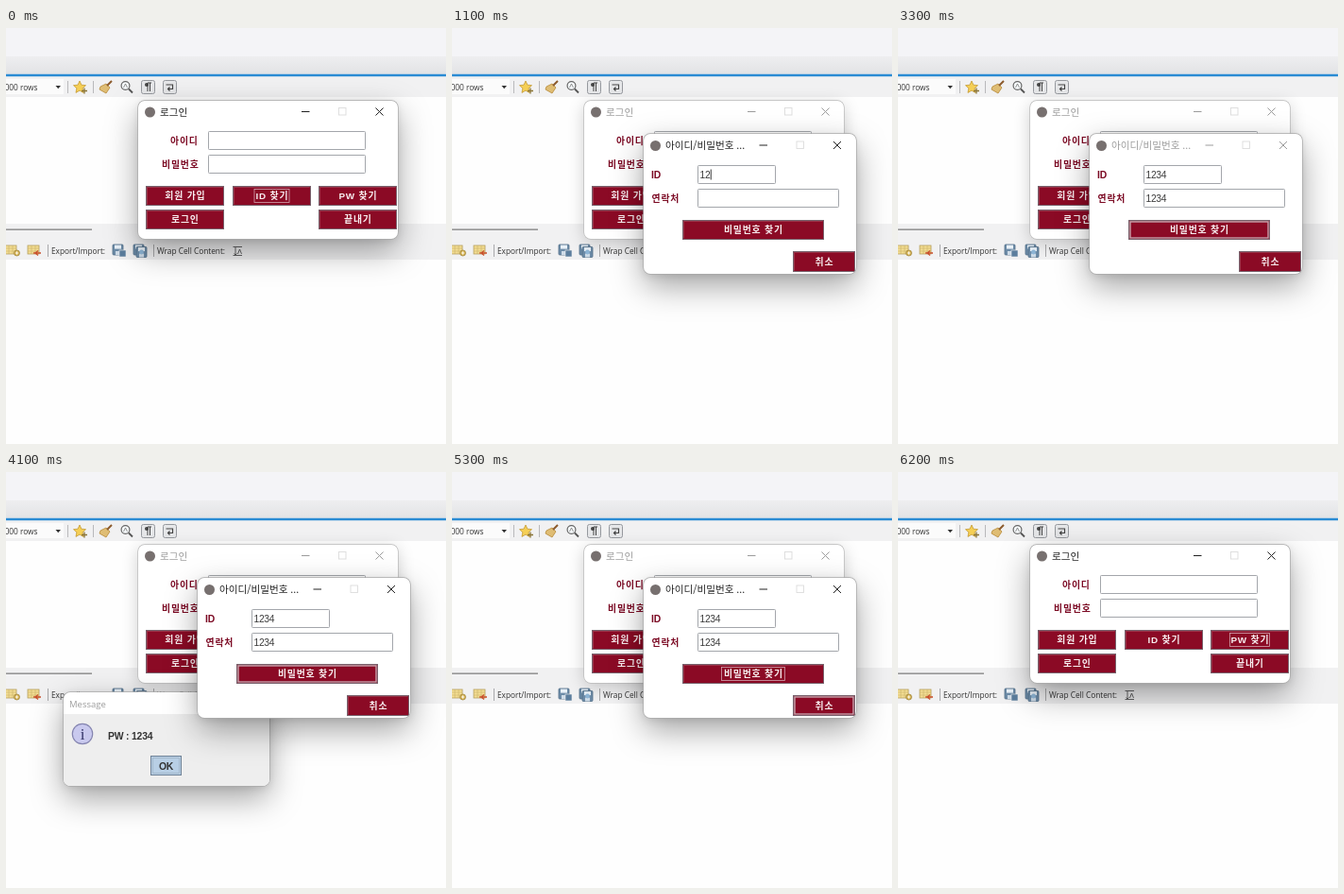
Animation, 466 px wide and 440 px high, one loop 6300 ms. Source, as an HTML page:

```html
<!DOCTYPE html>
<html lang="ko">
<head>
<meta charset="utf-8">
<title>Password lookup</title>
<style>
html, body { margin: 0; width: 100%; height: 100%; overflow: hidden; background: #fefefe; }
#stage { position: relative; width: 466px; height: 440px; overflow: hidden; }
svg { display: block; }
.win { position: absolute; overflow: hidden; border-radius: 7px; background: #fff;
  box-shadow: 0 0 0 .7px #bbb, 0 4px 18px rgba(0,0,0,.2); }
.win.lifted { box-shadow: 0 0 0 .7px #aaa, 0 13px 34px rgba(0,0,0,.36), 0 2px 8px rgba(0,0,0,.1); }
.bar { color: #9c9c9c; }
.active .bar { color: #222; }
text { white-space: pre; }
.ui { font-family: "Open Sans", "Noto Sans", sans-serif; font-size: 8.3px; fill: #333; }
.title { font-family: "Noto Sans CJK KR", "Noto Sans CJK", sans-serif; font-size: 10.6px; fill: currentColor; }
.bold { font: bold 9.9px "Liberation Sans", "Noto Sans CJK KR", "Noto Sans CJK", sans-serif; letter-spacing: .8px; }
.label { fill: #7c0a24; }
.latin { font-size: 10.4px; letter-spacing: -.2px; }
.num { font: 10.3px "Liberation Sans", sans-serif; letter-spacing: -.35px; fill: #3c3c3c; }
</style>
</head>
<body>
<div id="stage"></div>
<script>
const stage = document.getElementById('stage');
const LOOP = 6300, STEP = 100;

const rect = (x, y, w, h, fill, more = '') =>
  `<rect x="${x}" y="${y}" width="${w}" height="${h}" fill="${fill}" ${more}/>`;
const path = (d, stroke, width = 1, fill = 'none') =>
  `<path d="${d}" stroke="${stroke}" stroke-width="${width}" fill="${fill}"/>`;
const text = (x, y, str, cls, more = '') => `<text x="${x}" y="${y}" class="${cls}" ${more}>${str}</text>`;
const dot = (x, y, r, fill, more = '') => `<circle cx="${x}" cy="${y}" r="${r}" fill="${fill}" ${more}/>`;
const outline = color => `stroke="${color}"`;

function button(id, x, y, w, h, label, textW) {
  const cx = x + w / 2, cy = y + h / 2;
  return rect(x + .5, y + .5, w - 1, h - 1, '#8b0a25', outline('#77606b'))
    + path(`M${x + 1.5} ${y + h - 1.5}V${y + 1.5}H${x + w - 1.5}`, '#a14558', .7)
    + rect(x + 2, y + 2, w - 4, h - 4, 'none', `stroke="#c6abb2" stroke-width="1.3" id="${id}Press"`)
    + rect(cx - textW / 2 - 1.5, cy - 7, textW + 3, 14, 'none', `stroke="#d3a2ad" stroke-width=".8" id="${id}Focus"`)
    + text(cx + .4, cy + 3.7, label, 'bold', 'fill="#f8eef0" text-anchor="middle"');
}

const field = (x, y, w, id = '') =>
  rect(x + .5, y + .5, w - 1, 19, '#fff', outline('#a3a6ab') + ' rx=".8"')
  + (id ? text(x + 2.5, y + 14, '', 'num', `id="${id}"`)
    + rect(x + 3, y + 4.5, .9, 11, '#222', `id="${id}Caret"`) : '');

function titleBar(x, y, w, title) {
  const r = x + w - 19.5, cy = y + 11.5;
  return `<g class="bar">` + dot(x + 12.5, y + 12, 5.5, '#77706f')
    + text(x + 23, y + 15.5, title, 'title')
    + path(`M${r - 82.5} ${cy}h8.5M${r - 4} ${cy - 4}l8 8m0 -8l-8 8`, 'currentColor')
    + rect(r - 43, cy - 4, 7.5, 7.5, 'none', 'stroke="#dcdcdc" stroke-width=".9"') + `</g>`;
}

function makeWindow(x, y, w, h, body) {
  const el = document.createElement('div');
  el.className = 'win';
  el.style.cssText = `left:${x}px;top:${y}px;width:${w}px;height:${h}px`;
  el.innerHTML = `<svg width="${w}" height="${h}" viewBox="${x} ${y} ${w} ${h}">${body}</svg>`;
  stage.append(el);
  return el;
}

const floppy = (x, y) => rect(x, y, 11, 11, '#6d8ca8', 'rx="1" stroke="#546f88" stroke-width=".8"')
  + rect(x + 2, y + .6, 7, 4, '#e9f1f8') + rect(x + 3, y + 7, 5, 4, '#cfdce8');
const sheet = (x, y) => rect(x, y, 12, 9, '#f3dd92', 'stroke="#b59f5c" stroke-width=".8"')
  + path(`M${x} ${y + 3}h12M${x} ${y + 6}h12M${x + 4} ${y}v9M${x + 8} ${y}v9`, '#c9b26a', .6);
const toggle = x => rect(x, 55.5, 14, 14, '#e6e7e9', 'rx="2" stroke="#96999e"');

const backdrop =
  `<linearGradient id="band" x2="0" y2="1"><stop stop-color="#eeeef0"/><stop offset="1" stop-color="#e2e3e5"/></linearGradient>`
  + rect(0, 0, 466, 440, '#fefefe') + rect(0, 0, 466, 30, '#f4f4f7') + rect(0, 30, 466, 19, 'url(#band)')
  + rect(0, 51, 466, 22, '#f1f1f2') + rect(0, 48.5, 466, 3, '#8fc0e6') + rect(0, 49, 466, 2, '#2a8bd3')
  + rect(0, 54, 61, 16, '#fbfbfb') + text(33.5, 65.7, '000 rows', 'ui', 'text-anchor="end"')
  + path('M52.5 61h5.5l-2.75 3.2z', 'none', 0, '#333')
  + path('M65.5 56v13M92.5 56v13', '#b9b9bb')
  + path('M78 56l1.9 4.2 4.6.5-3.4 3.1.9 4.6-4-2.3-4 2.3.9-4.6-3.4-3.1 4.6-.5z', '#c49a33', .8, '#f5cf55')
  + path('M80 66.5h6M83 63.5v6', '#8b7435', 1.3)
  + path('M100 62l6-3 4 4-4 6-7-4z', '#b78a38', .8, '#dfbd74') + path('M107 61l5-5', '#8c5a2c', 2)
  + dot(126.5, 61, 4.4, '#f7fafc', 'stroke="#666" stroke-width="1.2"')
  + path('M130 64.5l4 4', '#555', 1.8) + path('M124.5 63l2-4 2 4', '#777', .8)
  + toggle(143.5) + path('M150 67v-9h4M152.5 58v9', '#444', 1) + dot(149, 60, 2, '#444')
  + toggle(166.5) + path('M169.5 60h7v4.5h-5m2 -2l-2 2 2 2', '#444', 1.2)
  + rect(0, 207, 466, 38, '#f1f1f2') + rect(0, 212.5, 91, 1.3, '#828282')
  + sheet(-1, 230) + dot(11.5, 238, 3, '#d6b455', 'stroke="#987d35" stroke-width=".7"')
  + path('M9.8 238h3.4M11.5 236.3v3.4', '#fff', .8)
  + sheet(23, 230) + path('M29 238h8m-3 -2.5l-3 2.5 3 2.5', '#c9502e', 1.3)
  + path('M44.5 229v13M156.5 229v13', '#a9a9ab')
  + text(48, 239, 'Export/Import:', 'ui') + floppy(113, 229) + rect(120, 235, 7, 7, '#5c7e9e', 'stroke="#eee" stroke-width=".6"')
  + floppy(135, 229) + floppy(138, 231.5) + dot(143.5, 237, 2.4, '#8fb7d8')
  + text(160, 239, 'Wrap Cell Content:', 'ui')
  + path('M240.5 231.5h9.5M240.5 240.5h9.5M243 232v8m-1.5 -1.5l1.5 1.5 1.5 -1.5M245.5 239l2 -5 2 5', '#555', .9);
stage.innerHTML = `<svg width="466" height="440" style="position:absolute">${backdrop}</svg>`;

const login = makeWindow(140, 77, 275, 146,
  titleBar(140, 77, 275, '로그인')
  + text(174, 123, '아이디', 'bold label') + field(214, 109, 167)
  + text(165, 148, '비밀번호', 'bold label') + field(214, 134, 167)
  + button('join', 148, 167, 83, 21, '회원 가입', 46)
  + button('findId', 240, 167, 83, 21, 'ID 찾기', 34)
  + button('findPw', 331, 167, 83, 21, 'PW 찾기', 39)
  + button('enter', 148, 192, 83, 21, '로그인', 30)
  + button('quit', 331, 192, 83, 21, '끝내기', 30));

const dialog = makeWindow(203, 112, 224.5, 147.5,
  titleBar(203, 112.5, 224.5, '아이디/비밀번호 ...')
  + text(211, 159, 'ID', 'bold latin label') + field(260, 145, 83, 'user')
  + text(211.5, 184, '연락처', 'bold label') + field(260, 170, 150, 'phone')
  + button('find', 244, 203, 150, 21, '비밀번호 찾기', 64)
  + button('cancel', 361, 236, 66, 22, '취소', 21));

const message = makeWindow(61, 233, 217.5, 98.5,
  rect(61, 256, 218, 76, '#eee')
  + `<g class="bar">` + text(67, 249, 'Message', 'ui', 'style="font-size:9.5px;fill:currentColor"')
  + path('M256 241l8 8m0 -8l-8 8', 'currentColor') + `</g>`
  + dot(81, 277, 10.7, '#c9c9ee', 'stroke="#8585b0" stroke-width="1.2"')
  + text(81, 282.5, 'i', '', 'text-anchor="middle" fill="#333366" style="font:17px Liberation Serif,serif"')
  + text(108, 283, 'PW : 1234', 'bold latin', 'fill="#333"')
  + rect(153.5, 300.5, 32, 20, '#d8e4ef', outline('#6f8296') + ' id="ok"')
  + rect(155.5, 302.5, 28, 16, 'none', outline('#a3b8cc'))
  + text(169.5, 315, 'OK', 'bold latin', 'text-anchor="middle" fill="#333"'));

const $ = id => document.getElementById(id);
const show = (id, on) => $(id).setAttribute('visibility', on ? 'inherit' : 'hidden');

// Steps are [time, value]; the last one reached holds.
const at = (steps, t) => steps.reduce((v, [time, next]) => t >= time ? next : v, 0);

const dialogAlpha = [[400, .55], [500, 1], [5700, .35], [5800, 0]];
const messageAlpha = [[3400, .6], [3500, 1], [4200, .5], [4300, 0]];
const keys = { user: [1000, 1100, 1200, 1300], phone: [2300, 2400, 2500, 2600] };
const focus = { user: [500, 1900], phone: [1900, 3200] };
const presses = { findPw: [300, 400], find: [3200, 4200], cancel: [5200, 5700] };
const buttons = ['join', 'findId', 'findPw', 'enter', 'quit', 'find', 'cancel'];
const within = (range, t) => !!range && t >= range[0] && t < range[1];

function setWindow(el, active, lifted, alpha) {
  el.classList.toggle('active', active);
  el.classList.toggle('lifted', lifted);
  el.style.opacity = alpha;
  el.style.visibility = alpha ? 'visible' : 'hidden';
  el.style.transform = `scale(${.96 + alpha * .04})`;
}

function typeInto(id, t) {
  const typed = keys[id].filter(k => t >= k);
  $(id).textContent = '1234'.slice(0, typed.length);
  const [start] = focus[id], last = typed.length ? typed[typed.length - 1] : start;
  show(id + 'Caret', within(focus[id], t) && (t - last) % 1000 < 500);
  $(id + 'Caret').setAttribute('x', (id === 'user' || id === 'phone' ? 263 : 0) + typed.length * 5.38);
}

function pose(t) {
  const onLogin = t < 400 || t >= 5700;
  const onDialog = within([400, 3300], t) || within([4100, 5700], t);
  setWindow(login, onLogin, onLogin, 1);
  // A window keeps its deep shadow for a moment after it loses focus.
  setWindow(dialog, onDialog, onDialog || t < 3500, at(dialogAlpha, t));
  setWindow(message, t < 4100, true, at(messageAlpha, t));
  dialog.style.zIndex = t >= 4100 ? 2 : 0;
  typeInto('user', t);
  typeInto('phone', t);
  const focused = { findId: t < 300, findPw: t >= 400, find: t >= 4200 };
  for (const id of buttons) {
    const pressed = within(presses[id], t);
    show(id + 'Press', pressed);
    show(id + 'Focus', focused[id] && !pressed);
  }
  $('ok').setAttribute('fill', t >= 3900 ? '#b8cfe5' : '#d8e4ef');
}

function tick() {
  pose(Math.floor(performance.now() % LOOP / STEP) * STEP);
  requestAnimationFrame(tick);
}
tick();
</script>
</body>
</html>
```
